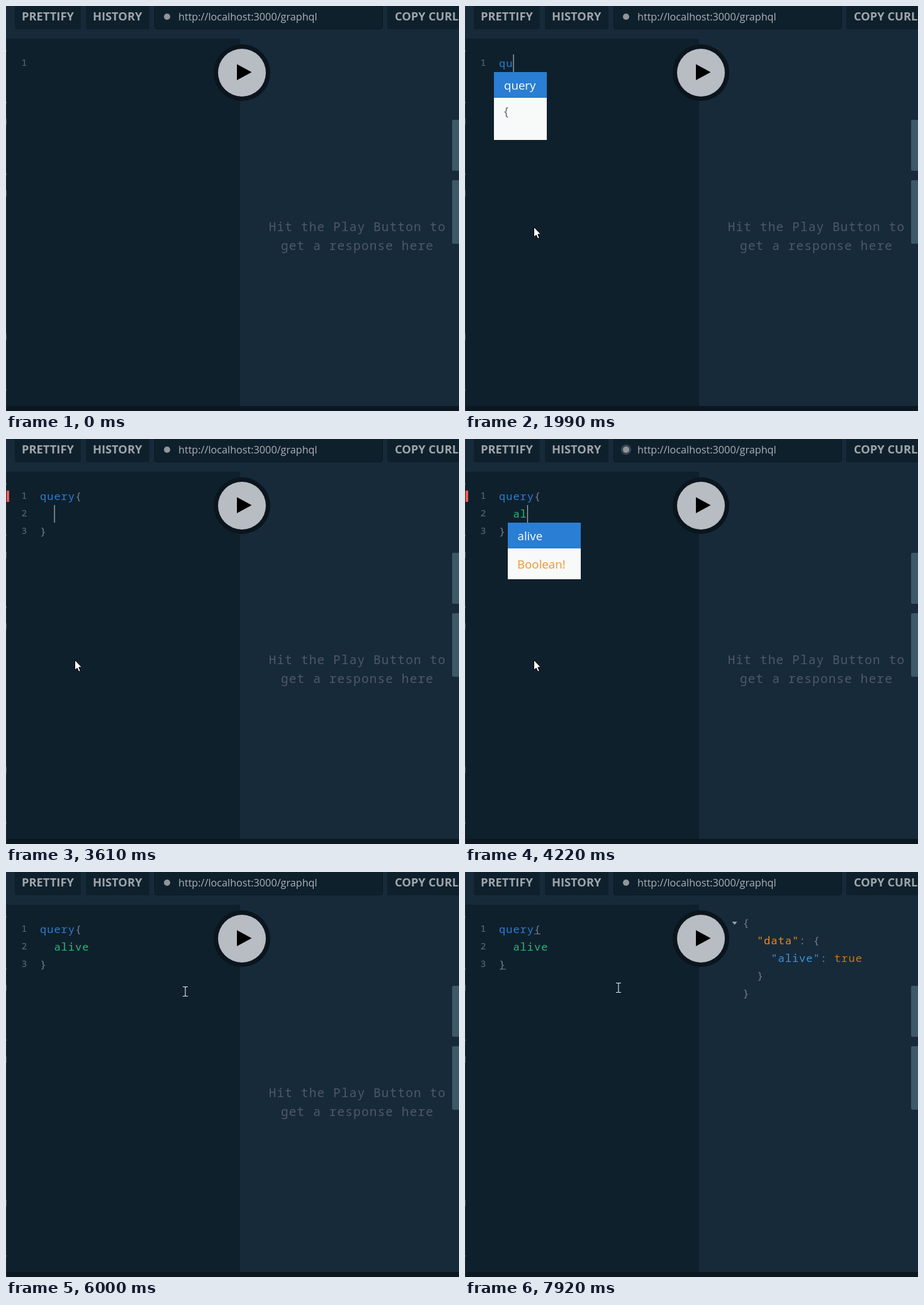
An HTML page that plays this animation: 720x644 px, repeating every 8 s.

```html
<!DOCTYPE html>
<html lang="en">
<head>
<meta charset="utf-8">
<title>GraphQL editor demo</title>
<style>
  html, body { margin: 0; width: 100%; height: 100%; overflow: hidden; background: #172a3a; }
  svg { display: block; width: 720px; height: 644px; }
  text { white-space: pre; }
  .btn { font: 700 18.3px "Open Sans", "Noto Sans", sans-serif; fill: #9fa6ab; }
  .url { font: 16.2px "Open Sans", "Noto Sans", sans-serif; fill: #abb1b6; }
  .code, .num, .hint { font-family: "Noto Sans Mono", "DejaVu Sans Mono", monospace; }
  .code { font-size: 17px; letter-spacing: 1px; fill: #737e87; }
  .num { font-size: 14.7px; fill: #5f6b74; }
  .hint { font-size: 19.4px; font-weight: 300; letter-spacing: 1.16px; fill: #4c5a66; text-anchor: middle; }
  .item { font: 18.67px "Open Sans", "Noto Sans", sans-serif; }
  .key { fill: #2a7ed3; }
  .field { fill: #29b973; }
  .name { fill: #f08d0e; }
  .prop { fill: #3896dc; }
  .bool { fill: #c87a12; }
  .well { fill: #0f202d; }
</style>
</head>
<body>
<svg viewBox="0 0 720 644">
  <rect width="720" height="644" fill="#172a3a"/>
  <rect class="well" y="52" width="372" height="584"/>
  <rect y="636" width="720" height="8" fill="#0b1822"/>
  <rect width="1" height="644" fill="#272d31"/>
  <g id="specks" fill="#596064"></g>

  <rect class="well" x="14" y="-8" width="105" height="45" rx="3"/>
  <rect class="well" x="127" y="-8" width="101" height="45" rx="3"/>
  <rect class="well" x="236.5" y="-8" width="362" height="44.5" rx="4" stroke="#09161f"/>
  <rect class="well" x="606" y="-8" width="130" height="45" rx="3"/>
  <text class="btn" x="25" y="23">PRETTIFY</text>
  <text class="btn" x="138" y="23">HISTORY</text>
  <text class="btn" x="618" y="23">COPY CURL</text>
  <circle id="ring" cx="256" cy="17" fill="#c3d0da"/>
  <circle cx="256" cy="17" r="5" fill="#8f979d"/>
  <text class="url" x="274" y="22.5">http://localhost:3000/graphql</text>

  <g fill="#3d5866">
    <rect x="709" y="181" width="20" height="81" rx="2"/>
    <rect x="709" y="277" width="20" height="101" rx="2"/>
  </g>

  <g id="hint">
    <text class="hint" x="558.5" y="358">Hit the Play Button to</text>
    <text class="hint" x="558.5" y="388">get a response here</text>
  </g>
  <g id="reply" class="code">
    <text x="441.5" y="87">{</text>
    <text x="463.9" y="115"><tspan class="name">"data"</tspan>: {</text>
    <text x="486.3" y="143"><tspan class="prop">"alive"</tspan>: <tspan class="bool">true</tspan></text>
    <text x="463.9" y="171">}</text>
    <text x="441.5" y="199">}</text>
  </g>
  <path id="fold" d="M424.5 79h8l-4 5z" fill="#9aa2a8"/>

  <rect id="error" x="1" y="82" width="4" height="18" fill="#f25c54"/>
  <text class="num" x="24.4" y="95">1</text>
  <g id="more" class="num">
    <text x="24.4" y="123">2</text>
    <text x="24.4" y="151">3</text>
  </g>
  <g class="code">
    <text x="54" y="97"><tspan id="word" class="key"></tspan><tspan id="brace"></tspan></text>
    <text id="field" class="field" x="76.4" y="125"></text>
    <text id="close" x="54" y="153">}</text>
  </g>
  <path id="under1" d="M110 98.5h10" stroke="#6f7a83"/>
  <path id="under3" d="M55 154.5h10" stroke="#6f7a83"/>
  <rect id="caret" width="1.33" height="28" fill="#a3a9a8"/>

  <circle cx="375" cy="106" r="45" fill="#0b151d"/>
  <circle id="play" cx="375" cy="106" r="38"/>
  <path d="M367 92.5L390.5 105.3L367 118z"/>

  <g id="words" class="item">
    <rect id="wordsBox" x="46" y="105" width="84" fill="#f8f9f9"/>
    <rect x="46" y="105" width="84" height="41" fill="#2a7ed3"/>
    <text x="62" y="133" fill="#fff">query</text>
    <text id="second" x="62" y="174" fill="#53616c">{</text>
  </g>
  <g id="fields" class="item">
    <rect x="68" y="133" width="116" height="90" fill="#f8f9f9"/>
    <rect x="68" y="133" width="116" height="41" fill="#2a7ed3"/>
    <text x="83.5" y="161" fill="#fff">alive</text>
    <text x="83" y="206" fill="#f0952c">Boolean!</text>
  </g>

  <g id="mouse">
    <path id="arrow" transform="translate(-.5 -.5)" d="M0 0V16L3.700 12.800L6.200 18.500L8.800 17.500L6.400 11.500H11Z" fill="#fff" stroke="#000"/>
    <path id="beam" d="M-4 -7.5H-1L0 -6.5L1 -7.5H4M0 -7V7M-4 7.5H-1L0 6.5L1 7.5H4" fill="none" stroke="#e9e9e9" stroke-width="1.1"/>
    <g id="hand" stroke="#000" stroke-linejoin="round">
      <path d="M-1.8 1.4Q0 -1 1.8 1.4V7Q4 5.8 5.3 7.6Q7.4 6.8 8.3 8.6Q10.4 8.3 10.5 10.7V16L8.5 20V23.5H-2V20.5L-6.6 14.5Q-7 11.5 -4.3 12L-1.8 14Z" fill="#fff"/>
      <path d="M1.8 7V11M5.3 8V11.5M8.3 9V12" fill="none"/>
    </g>
  </g>
</svg>
<script>
const LOOP = 8000, CELL = 11.2, BLINK = 530;
const $ = id => document.getElementById(id);
const show = (id, on) => $(id).setAttribute('display', on ? 'inline' : 'none');
const set = (id, attrs) => { for (const k in attrs) $(id).setAttribute(k, attrs[k]); };
const within = (t, a, b) => t >= a && t < b;
const lastAt = (rows, t) => rows.filter(r => r[0] <= t).pop();

// Redraw moments: [first, last, count]
const runs = [
  [0, 0, 1], [150, 930, 11], [990, 990, 1], [1150, 1150, 1], [1380, 1380, 1], [1840, 1840, 1],
  [1990, 2530, 8], [2990, 3070, 2], [3300, 3380, 2], [3610, 3610, 1], [4070, 4610, 8],
  [4990, 5300, 5], [5620, 6380, 11], [6460, 6540, 2], [6690, 6690, 1], [7000, 7460, 7], [7920, 7920, 1]
];
const ticks = runs.flatMap(([a, b, n]) =>
  Array.from({ length: n }, (_, i) => n > 1 ? a + (b - a) * i / (n - 1) : a));

// Editor states: [time, word, braces, field, caret line, caret column]
const edits = [
  [0, '', '', '', 0, 0],
  [850, '', '', '', 0, 0],
  [1838, 'q', '', '', 0, 1],
  [1988, 'qu', '', '', 0, 2],
  [2140, 'que', '', '', 0, 3],
  [2295, 'quer', '', '', 0, 4],
  [2445, 'query', '', '', 0, 5],
  [2988, 'query', '{}', '', 0, 6],
  [3608, 'query', '{', '', 1, 2],
  [4068, 'query', '{', 'a', 1, 3],
  [4215, 'query', '{', 'al', 1, 4],
  [4370, 'query', '{', 'ali', 1, 5],
  [4450, 'query', '{', 'aliv', 1, 6],
  [4600, 'query', '{', 'alive', 1, 7],
  [4985, 'query', '{', 'alive', 1, 7],
  [7388, 'query', '{', 'alive', 2, 1]
];

// Pointer path: [time, x, y]
const path = [
  [150, 392, -10], [460, 390, 100], [700, 200, 190], [852, 112, 340], [930, 110, 352],
  [5560, 110, 352], [5800, 165, 300], [6100, 345, 135], [6240, 401, 86],
  [6940, 401, 86], [7170, 316, 143], [7390, 244, 184], [LOOP, 244, 184]
];
const pulses = [200, 2277, 4164, 6215];

function pointerAt(t) {
  const i = Math.max(1, path.findIndex(p => p[0] > t));
  const [a, b] = [path[i - 1], path[i]];
  const k = Math.max(0, (t - a[0]) / (b[0] - a[0]));
  return [a[1] + (b[1] - a[1]) * k, a[2] + (b[2] - a[2]) * k];
}

function drawEditor(t) {
  const [since, word, brace, field, line, col] = lastAt(edits, t);
  $('word').textContent = word;
  $('brace').textContent = brace;
  $('field').textContent = field;
  show('more', t >= 3608);
  show('close', t >= 3608);
  show('error', within(t, 3065, 5060));
  show('under1', within(t, 3298, 3608) || t >= 7380);
  show('under3', t >= 7380);

  const focused = within(t, 850, 6220) || t >= 7388;
  show('caret', focused && Math.floor((t - since) / BLINK) % 2 === 0);
  set('caret', { x: 54 + CELL * col, y: 77 + 28 * line });

  const two = t < 2140;
  show('words', within(t, 1988, 2445));
  show('second', two);
  set('wordsBox', { height: two ? 108 : 67 });
  show('fields', within(t, 4140, 4985));
}

function drawPointer(t) {
  const [x, y] = pointerAt(t);
  const hover = t >= 150 && Math.hypot(x - 375, y - 106) < 45;
  const arrow = !hover && (y < 52 || within(t, 925, 5600));
  show('mouse', t >= 150);
  show('hand', hover);
  show('arrow', arrow);
  show('beam', !hover && !arrow);
  set('mouse', { transform: `translate(${Math.round(x)} ${Math.round(y)})` });
  set('play', { fill: hover ? '#c4c8ce' : '#b8bcc3' });
}

function drawRing(t) {
  const age = t - (pulses.filter(p => p <= t).pop() ?? -LOOP);
  const fade = Math.max(0, 1 - age / 900);
  set('ring', { r: 6 + 10 * (1 - Math.exp(-age / 250)), opacity: 0.25 * fade * fade });
}

function draw(now) {
  const t = ticks.filter(k => k <= now + 8).pop();
  drawEditor(t);
  drawPointer(t);
  drawRing(t);
  show('hint', t < 6225);
  show('reply', t >= 6300);
  show('fold', t >= 6685);
}

for (const y of [71, 153, 184, 267, 298, 526, 610]) {
  const tall = [184, 298, 526].includes(y);
  $('specks').insertAdjacentHTML('beforeend',
    `<rect y="${y - (tall ? 5 : 1)}" width="1" height="${tall ? 10 : 3}"/>`);
}

const start = performance.now();
function frame() {
  draw((performance.now() - start) % LOOP);
  requestAnimationFrame(frame);
}
frame();
</script>
</body>
</html>
```
